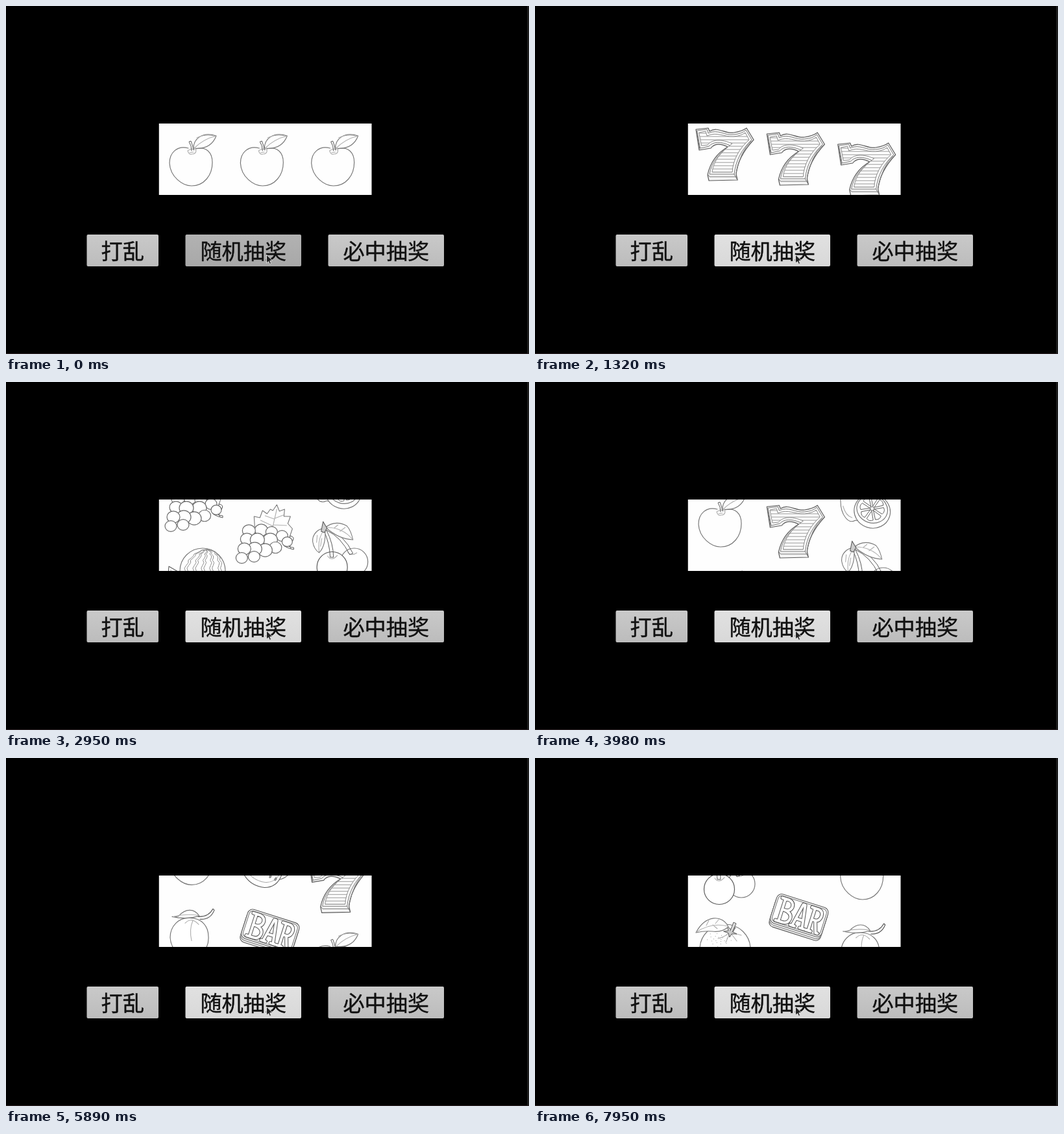
An HTML page with a canvas that plays this animation: 806 px wide and 536 px high, repeating every 8000 ms.

```html
<!DOCTYPE html>
<html lang="zh-CN">
<head>
<meta charset="utf-8">
<style>
html, body { margin: 0; width: 100%; height: 100%; overflow: hidden; background: #000; }
canvas { display: block; width: 806px; height: 536px; }
</style>
</head>
<body>
<canvas id="stage" width="806" height="536"></canvas>
<script>
const ctx = document.getElementById('stage').getContext('2d');
const LOOP = 8000, STEP = 147.2, CELL = 110, COL = 109.33;
const VIEW = { x: 235.5, y: 181, w: 328.2, h: 110 };
const INK = '#787878', SOFT = '#b0b0b0', DARK = '#5a5a5a';

// Pencil helpers
function line(d, color = INK, width = 1.15, fill) {
  const p = new Path2D(d);
  if (fill) { ctx.fillStyle = fill; ctx.fill(p); }
  ctx.strokeStyle = color;
  ctx.lineWidth = width;
  ctx.stroke(p);
}
function oval(x, y, rx, ry = rx, color = INK, fill = '#fff', turn = 0, width = 1.2) {
  ctx.beginPath();
  ctx.ellipse(x, y, rx, ry, turn, 0, 7);
  if (fill) { ctx.fillStyle = fill; ctx.fill(); }
  ctx.strokeStyle = color;
  ctx.lineWidth = width;
  ctx.stroke();
}
function slab(x, y, w, h, r, color, fill) {
  ctx.beginPath();
  ctx.roundRect(x - w / 2, y - h / 2, w, h, r);
  ctx.fillStyle = fill;
  ctx.fill();
  ctx.strokeStyle = color;
  ctx.lineWidth = 1.1;
  ctx.stroke();
}
function clipped(d, draw) {
  ctx.save();
  ctx.clip(new Path2D(d));
  draw();
  ctx.restore();
}

function apple() {
  line('M45 38C28 33 16 45 16 61C17 82 36 96 50 96C69 96 82 80 82 60C82 44 72 35 57 39', INK, 1.2);
  line('M44 42Q50 37 57 41M44 42Q46 49 51 47Q57 47 57 41M47 45L53 44', SOFT);
  line('M50 42Q50 34 46 28L49 27Q52 34 53 41', DARK, 1);
  line('M53 38C53 24 66 12 88 19C83 32 72 40 53 38Z');
  line('M54 38Q68 24 88 19M58 22Q70 16 85 19', SOFT);
}

function plum() {
  line('M47 37C30 36 17 50 17 67C18 85 32 99 47 99C64 99 77 84 76 66C76 50 66 37 47 37Z', INK, 1.2, '#fff');
  line('M52 41Q46 55 50 72M40 45Q50 35 61 47', SOFT);
  line('M60 35Q76 36 83 23L85 25Q79 40 63 39', DARK);
  line('M62 34C54 22 41 22 30 34Q24 36 20 35Q42 40 62 34Z', INK, 1.15, '#fff');
  line('M22 35Q40 30 60 33', SOFT);
}

function lemon() {
  line('M24 94C13 80 13 49 29 31Q35 22 42 25C69 27 84 50 79 77Q66 104 39 98Q31 103 24 94Z', INK, 1.1, '#fff');
  line('M20 76Q24 91 34 94M29 43Q36 34 44 34', SOFT);
  oval(65, 84, 28, 26, INK, '#fff', 0.3);
  oval(65, 81, 24, 21, INK, '#fff', 0.3);
  for (let i = 0; i < 8; i++) {
    ctx.save();
    ctx.translate(65, 80);
    ctx.rotate(i * Math.PI / 4 + 0.2);
    line('M4 0L17 -5Q21 0 17 5Z', DARK, 0.9);
    ctx.restore();
  }
  oval(65, 80, 3, 3);
}

function cherry() {
  oval(82, 82, 21, 21);
  oval(48, 90, 23.5, 23.5, DARK);
  line('M72 67Q78 74 86 68M41 73Q47 82 56 72', SOFT);
  line('M35 34Q44 52 45 75L50 75Q50 54 39 33Q62 44 75 71L80 69Q67 41 40 30', DARK, 1);
  line('M37 31C26 30 17 40 18 51Q20 63 28 68Q39 56 37 31Z', INK, 1.1, '#fff');
  line('M37 31Q25 45 28 67M25 41L24 52M32 46L30 58', SOFT);
  line('M38 29C48 20 62 21 71 27Q77 34 80 48Q58 47 38 29Z', INK, 1.1, '#fff');
  line('M39 29Q64 29 79 47M51 30L57 25M60 35L68 29', SOFT);
  line('M34 20L31 35L36 37L40 30Z', DARK, 1.1, '#ccc');
}

function orange() {
  oval(57, 72.5, 39, 38.5);
  line('M63 48Q53 55 46 56M64 48L58 62M66 48L75 60M67 47L82 51', SOFT);
  ctx.fillStyle = '#999';
  for (let i = 0; i < 22; i++) {
    const a = i * 2.4, r = 7 + 1.25 * i;
    ctx.fillRect(46 + Math.cos(a) * r * .6, 57 + Math.sin(a) * r * .35, 1, 1);
  }
  line('M55 45L62 44L60 37L66 42L73 39L69 46L75 49L67 49L64 54L62 48Z', DARK, 1, '#ccc');
  line('M65 44L70 31L74 33L68 46', DARK, 1, '#ddd');
  line('M62 38C53 19 27 19 12 47Q25 44 37 45Q52 47 62 38Z', INK, 1.15, '#fff');
  line('M13 46Q35 31 61 37M28 36L32 28M42 33L47 27M38 35L45 41', SOFT);
}

const GRAPES = [[48, 49, 10], [64, 52, 9], [29, 50, 10], [80, 58, 9], [88, 67, 8], [26, 63, 10],
  [62, 64, 11], [42, 64, 11], [70, 76, 9.5], [54, 80, 11], [38, 78, 11], [22, 78, 10], [18, 92, 9], [37, 90, 9]];
function grapes() {
  line('M38 44L37 28L46 30L50 19L57 24L62 17L66 19L72 10L76 20L84 17L83 28L93 28L89 39L96 47L91 62L74 60L58 46Z', INK, 1.1, '#fff');
  line('M72 17Q68 34 65 48M69 31L82 26M67 41L87 42M68 32L54 27M66 43L47 34', SOFT);
  line('M86 70Q92 76 98 76L98 79Q91 78 84 74M92 58Q102 59 95 68Q88 74 94 77', DARK, 1);
  for (const [x, y, r] of GRAPES) oval(x, y, r, r * .92, '#6c6c6c');
}

function melon() {
  oval(67, 51, 35);
  for (let i = -2; i < 3; i++) {
    for (const gap of [-2, 2]) {
      const bend = i * 13 + gap;
      ctx.beginPath();
      for (let k = 0; k <= 24; k++) {
        const a = k / 24 * Math.PI;
        ctx.lineTo(67 + bend * Math.sin(a) + 1.4 * Math.sin(k * 2.2) + 7 * Math.cos(a), 51 - 33 * Math.cos(a));
      }
      ctx.strokeStyle = '#8c8c8c';
      ctx.lineWidth = 1;
      ctx.stroke();
    }
  }
  line('M15 44C12 67 24 94 53 97Q73 97 80 76Q49 64 15 44Z', DARK, 1.1, '#fff');
  line('M18 49C20 70 33 86 54 89Q68 90 76 77', SOFT);
  for (let i = 0; i < 12; i++) {
    const low = i > 5, col = i % 6;
    oval(24 + col * 8 + (low ? 6 : 0), 55 + col * 4 + (low ? 9 : 0), 1.3, 2.4, DARK, '#aaa', .4, .8);
  }
}

const BAR_STROKES = 'M-33 -18L-22 -18Q-14 -17 -14 -9Q-15 -1 -24 -1Q-12 0 -12 9Q-13 18 -22 18L-33 18M-28 -18L-28 18M-24 -1L-28 -1' +
  'M-9 18L-2 18M-6 18L1 -18L4 -18L10 18M6 18L13 18M-3 6L8 6' +
  'M15 -18L26 -18Q33 -17 33 -9Q32 0 25 0L20 0M20 -18L20 18M16 18L24 18M26 0L32 18L35 18';
function bar() {
  ctx.save();
  ctx.translate(62, 53.5);
  ctx.rotate(.31);
  slab(0, 6, 83, 47, 8, DARK, '#eee');
  slab(0, 3, 83, 47, 8, INK, '#f4f4f4');
  slab(0, 0, 83, 47, 8, DARK, '#fff');
  slab(0, 0, 78, 42, 6, INK, '#fff');
  line(BAR_STROKES, DARK, 6);
  line(BAR_STROKES, '#fff', 3.9);
  ctx.restore();
}

const SEVEN_IN = 'M17 22L27 20L29 27C45 20 55 29 70 28Q82 27 88 22L94 33C79 46 69 64 68 83L37 83C39 66 50 52 68 39C50 31 36 33 30 41L21 42Z';
function seven() {
  line('M12 17L31 15L33 20C46 12 56 24 70 22Q83 20 90 15L101 33C87 48 76 66 74 86L76 95L32 96L30 87C34 68 44 54 61 44C50 38 40 39 35 46L17 49Z', DARK, 1.2, '#f4f4f4');
  line('M14 19L29 17L31 23C46 16 56 27 70 25Q83 24 89 18L98 33C83 47 73 65 71 86L33 86C36 68 47 54 65 42C50 35 38 36 32 43L19 46Z', INK, 1, '#fff');
  line(SEVEN_IN, INK, .9, '#fff');
  clipped(SEVEN_IN, () => {
    for (let y = 23; y < 84; y += 5) line(`M10 ${y}H104`, '#959595', 1.1);
  });
  line('M31 87L33 90L74 90M71 86L76 95M97 35Q81 50 74 84M13 20L18 47', INK, 1);
}

const REEL = [apple, plum, lemon, cherry, orange, grapes, melon, bar, seven];

// Distance travelled by each reel at the given steps: slow start, then full speed
const KNOTS = [0, 9, 20, 27, 35, 46, 54];
const TRAVEL = [
  [0, 102, 389, 967, 2016, 4041, 5541],
  [0, 109, 438, 1094, 2279, 4466, 6168],
  [0, 125, 674, 1694, 3466, 7116, 9841]
];
function slope(d, i) {
  if (i === 0) return 0;
  const rate = k => (d[k + 1] - d[k]) / (KNOTS[k + 1] - KNOTS[k]);
  if (i === KNOTS.length - 1) return rate(i - 1);
  const a = rate(i - 1), b = rate(i);
  return 2 * a * b / (a + b);
}
function travel(d, s) {
  let i = 0;
  while (i < KNOTS.length - 2 && s >= KNOTS[i + 1]) i++;
  const h = KNOTS[i + 1] - KNOTS[i], u = (s - KNOTS[i]) / h, v = 1 - u;
  return d[i] * (1 + 2 * u) * v * v + slope(d, i) * h * u * v * v
    + d[i + 1] * u * u * (3 - 2 * u) - slope(d, i + 1) * h * u * u * v;
}

function drawReels(step) {
  ctx.save();
  ctx.beginPath();
  ctx.rect(VIEW.x, VIEW.y, VIEW.w, VIEW.h);
  ctx.clip();
  ctx.fillStyle = '#fefefe';
  ctx.fill();
  ctx.lineJoin = ctx.lineCap = 'round';
  const size = REEL.length * CELL;
  TRAVEL.forEach((d, col) => {
    const shift = travel(d, step) % size;
    REEL.forEach((draw, k) => {
      const y = (k * CELL + shift + CELL) % size - CELL;
      if (y >= CELL) return;
      ctx.save();
      ctx.translate(236 + col * COL, VIEW.y + y);
      draw();
      ctx.restore();
    });
  });
  ctx.restore();
}

function button(x, w, label, top, bottom) {
  const g = ctx.createLinearGradient(0, 352, 0, 401);
  g.addColorStop(0, top);
  g.addColorStop(1, bottom);
  ctx.fillStyle = g;
  ctx.beginPath();
  ctx.roundRect(x, 352, w, 49, 2);
  ctx.fill();
  ctx.fillStyle = ctx.strokeStyle = '#111';
  ctx.lineWidth = .4;
  ctx.fillText(label, x + w / 2, 389.5);
  ctx.strokeText(label, x + w / 2, 389.5);
}

function drawCursor() {
  line('M401.5 383L401.5 396L404.5 393.5L406.5 397.5L408.5 396.5L406.8 392.5L410.5 392Z', '#ddd', 1, '#222');
}

function render(t) {
  const step = Math.min(54, Math.floor((t + 8) / STEP));
  ctx.fillStyle = '#000';
  ctx.fillRect(0, 0, 806, 536);
  ctx.fillStyle = '#1a1a1a';
  ctx.fillRect(803, 0, 3, 536);
  ctx.fillStyle = '#2c2024';
  ctx.fillRect(0, 535, 806, 1);
  drawReels(step);
  ctx.font = '33.2px "Noto Sans CJK SC", "Noto Sans CJK", sans-serif';
  ctx.textAlign = 'center';
  button(124.5, 110.5, '打乱', '#c9c9c9', '#bcbcbc');
  const [top, bottom] = step ? ['#e1e1e1', '#d8d8d8'] : ['#b2b2b2', '#a8a8a8'];
  button(276.5, 178.5, '随机抽奖', top, bottom);
  button(496.5, 178.5, '必中抽奖', '#c9c9c9', '#bcbcbc');
  drawCursor();
}

function tick() {
  render(performance.now() % LOOP);
  requestAnimationFrame(tick);
}
tick();
</script>
</body>
</html>
```
